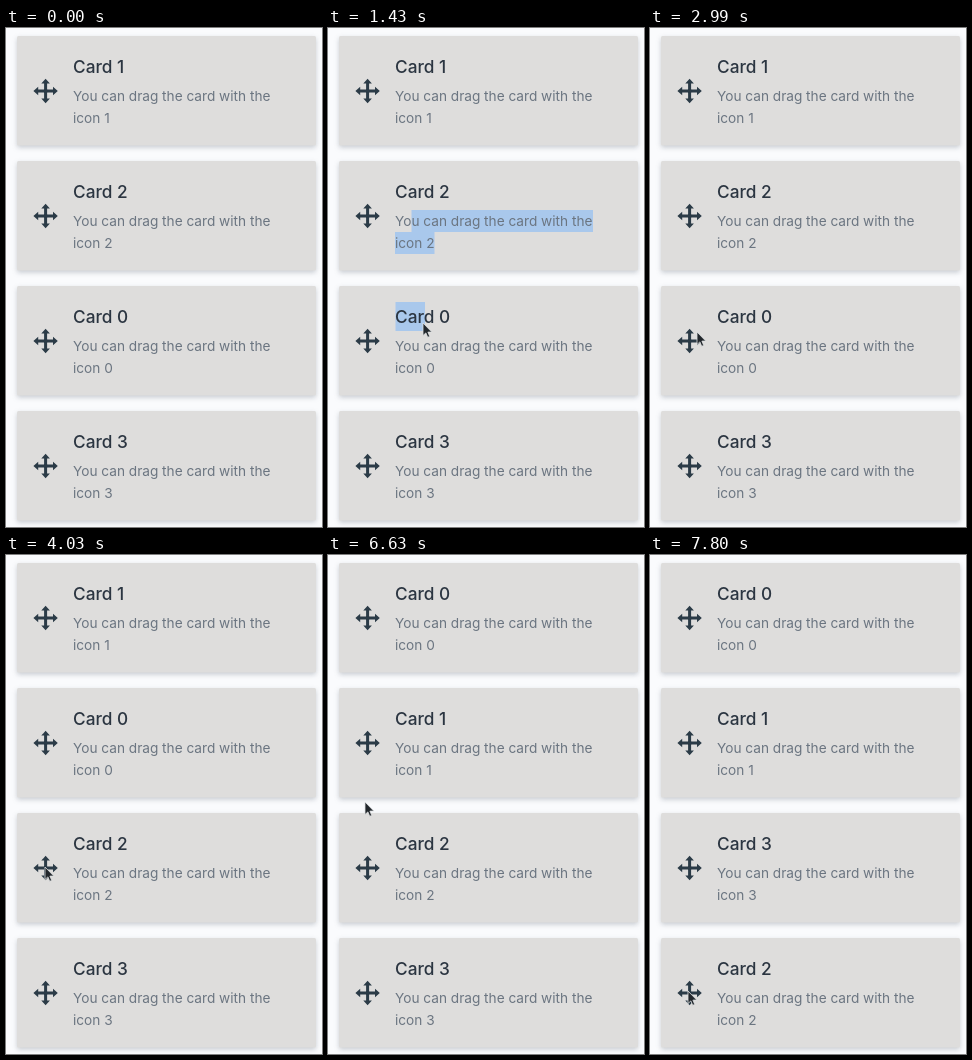
Recreate the animation shown at these times as an HTML page. Size 316 by 499 pixels, loop 8000 ms.

```html
<!DOCTYPE html>
<html lang="en">
<head>
<meta charset="utf-8">
<title>Sortable cards</title>
<style>
  html, body { margin: 0; width: 100%; height: 100%; overflow: hidden; background: #fafbfd; }
  svg { display: block; width: 316px; height: 499px; }
  text { font-family: Inter, "Open Sans", sans-serif; }
  .card { fill: #dedddc; filter: drop-shadow(0 2px 2.5px rgba(50, 65, 78, .25)); }
  .title { font-size: 17.25px; font-weight: 500; fill: #2b3541; }
  .body { font-size: 13.65px; fill: #6b7581; }
  .icon { fill: #2b3b47; }
  .selection { fill: #a9c8ec; }
  .cursor { fill: #22272c; stroke: #dfe1e2; stroke-width: .8; stroke-linejoin: round; }
</style>
</head>
<body>
<svg id="stage" viewBox="0 0 316 499"></svg>
<script>
const LOOP = 8000, TICK = 130, PITCH = 125, SLOTS = 4;
const stage = document.getElementById('stage');

// Each drop swaps a slot with the one below it.
const swaps = [
  { at: 3770, slot: 1 },
  { at: 5460, slot: 0 },
  { at: 7800, slot: 2 }
];

// The pointer rests between these moves.
const moves = [
  { from: 130, to: 910, x: 83, y: 191 },
  { from: 1170, to: 1430, x: 95, y: 295 },
  { from: 1690, to: 2210, x: 65, y: 253 },
  { from: 2600, to: 2990, x: 47, y: 304 },
  { from: 2990, to: 3250, x: 39, y: 312 },
  { from: 4290, to: 4680, x: 37, y: 193 },
  { from: 5980, to: 6630, x: 37, y: 247 },
  { from: 6630, to: 7540, x: 38, y: 436 }
];

function add(parent, tag, attrs, content = '') {
  const node = document.createElementNS('http://www.w3.org/2000/svg', tag);
  for (const key in attrs) node.setAttribute(key, attrs[key]);
  node.textContent = content;
  return parent.appendChild(node);
}

for (let i = 0; i < SLOTS; i++) {
  add(stage, 'rect', { class: 'card', x: 11, y: 8 + i * PITCH, width: 299, height: 109.5, rx: 1.5 });
}

const selection = add(stage, 'g', { class: 'selection' });
const firstLine = add(selection, 'rect', { y: 182, height: 22 });
add(selection, 'rect', { x: 67, y: 204, width: 39.5, height: 22 });
add(selection, 'rect', { x: 67.5, y: 274, width: 29.5, height: 29 });

const slots = Array.from({ length: SLOTS }, (_, i) => {
  const group = add(stage, 'g', { transform: `translate(0 ${i * PITCH})` });
  const icon = add(group, 'g', { class: 'icon', transform: 'translate(39.6 63)' });
  for (let turn = 0; turn < 4; turn++) {
    add(icon, 'path', { d: 'M0-12.2 4.3-7.4H1.5V1.5H-1.5V-7.4H-4.3Z', transform: `rotate(${turn * 90})` });
  }
  const title = add(group, 'text', { class: 'title', x: 67, y: 45 });
  add(group, 'text', { class: 'body', x: 67, y: 73.3 }, 'You can drag the card with the');
  const label = add(group, 'text', { class: 'body', x: 67, y: 95.3 });
  return { title, label };
});

const cursor = add(stage, 'path', { class: 'cursor', d: 'M0 0V12.5L2.9 9.9 4.7 14.3 6.7 13.4 4.9 9.1H8.8Z' });

function orderAt(t) {
  const order = [1, 2, 0, 3];
  for (const { at, slot } of swaps) {
    if (t >= at) [order[slot], order[slot + 1]] = [order[slot + 1], order[slot]];
  }
  return order;
}

function pointerAt(t) {
  let x = 40, y = 313;
  for (const move of moves) {
    const k = Math.min(1, Math.max(0, (t - move.from) / (move.to - move.from)));
    x += (move.x - x) * k;
    y += (move.y - y) * k;
  }
  return [x, y];
}

function show(node, visible) {
  node.style.display = visible ? '' : 'none';
}

function render(time) {
  const t = Math.floor((time % LOOP + 0.01) / TICK) * TICK;

  orderAt(t).forEach((id, i) => {
    slots[i].title.textContent = `Card ${id}`;
    slots[i].label.textContent = `icon ${id}`;
  });

  show(selection, t >= 1300 && t < 2470);
  const left = t < 1820 ? 83.5 : 76;
  firstLine.setAttribute('x', left);
  firstLine.setAttribute('width', 265 - left);

  show(cursor, t >= moves[0].from);
  cursor.setAttribute('transform', `translate(${pointerAt(t)})`);
}

const start = performance.now();
function frame() {
  render(performance.now() - start);
  requestAnimationFrame(frame);
}
frame();
</script>
</body>
</html>
```
